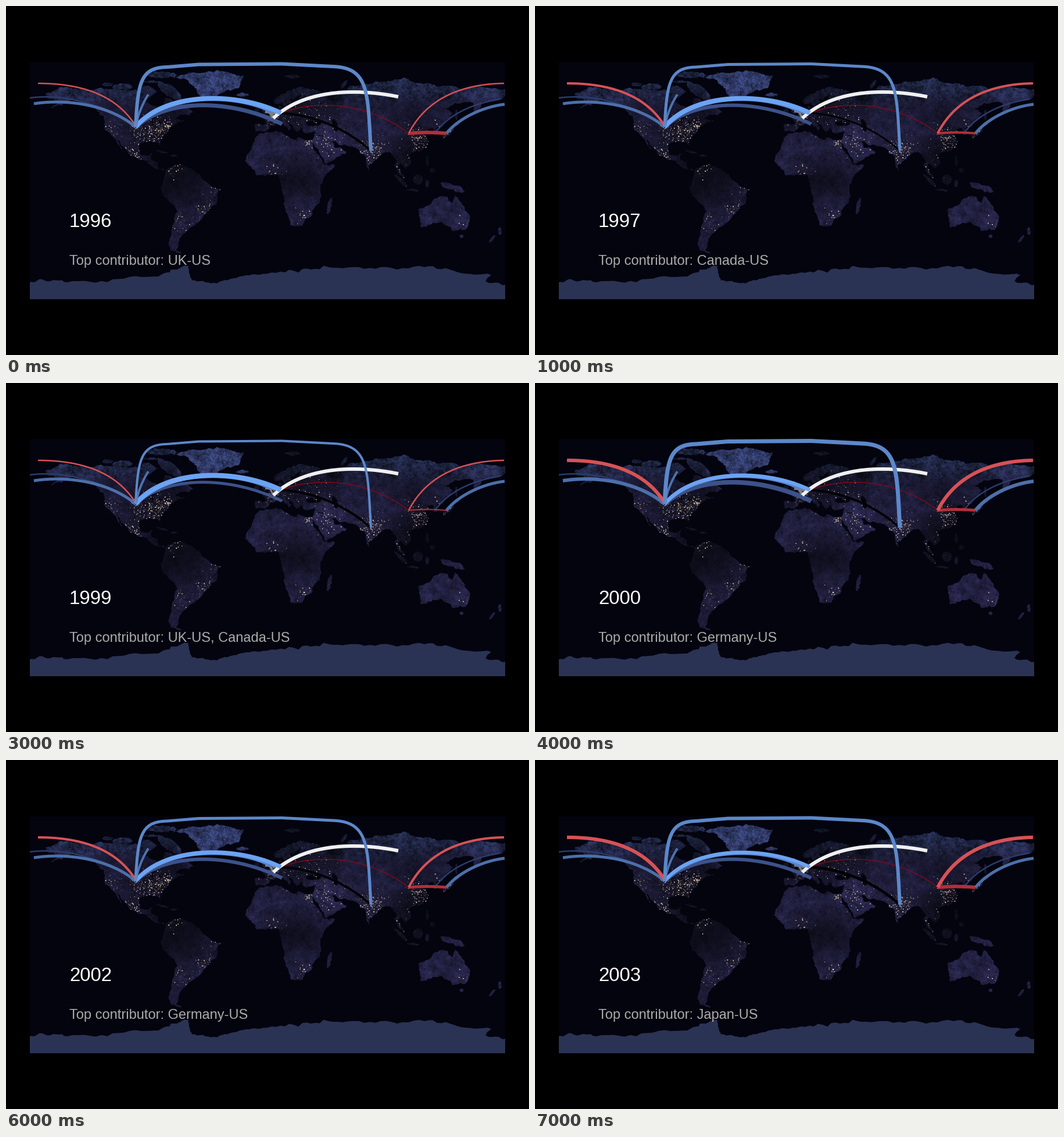
A matplotlib script for the animation above (8000 ms loop, 900 by 600 pixels).

```python
import numpy as np
import matplotlib.pyplot as plt
from matplotlib.animation import FuncAnimation
from matplotlib.patches import PathPatch, Rectangle
from matplotlib.path import Path

W, H, DPI = 900, 600, 100
LEFT, RIGHT, TOP, BOTTOM = 41, 859, 96.5, 504.5
SCALE = (RIGHT - LEFT) / 360
PT = 72 / DPI
OCEAN = "#04040f"
rng = np.random.default_rng(5)

fig = plt.figure(figsize=(W / DPI, H / DPI), dpi=DPI, facecolor="black")
ax = fig.add_axes([0, 0, 1, 1])
ax.axis("off")
ax.add_patch(Rectangle((LEFT, TOP), RIGHT - LEFT, BOTTOM - TOP, color=OCEAN, lw=0))


def project(lonlat):
    return np.array([W / 2, (TOP + BOTTOM) / 2]) + np.asarray(lonlat) * [SCALE, -SCALE]


def rough(p, rounds):
    """Break each edge up so that it reads as a coast."""
    for _ in range(rounds):
        q = np.roll(p, -1, 0)
        d = q - p
        size = np.hypot(*d.T)[:, None] + 1e-6
        push = rng.normal(0, 0.11, size.shape) * np.minimum(size, 14) / size
        mid = (p + q) / 2 + push * d[:, ::-1] * [1, -1]
        p = np.stack([p, mid], 1).reshape(-1, 2)
    return p


def coast(p, rounds=4):
    p = rough(p, rounds)
    x, y = p.T
    if np.sum(x * np.roll(y, -1) - y * np.roll(x, -1)) < 0:
        p = p[::-1]
    return Path(np.vstack([p, p[:1]]), closed=True)


def oval(lon, lat, rx, ry, tilt=0):
    a = np.linspace(0, 2 * np.pi, 10, endpoint=False)
    z = (rx * np.cos(a) + 1j * ry * np.sin(a)) * np.exp(1j * np.radians(tilt))
    return coast(project(np.column_stack([lon + z.real, lat + z.imag])), 2)


lands = []


def land(*coords):
    lands.append(coast(project(np.reshape(coords, (-1, 2)))))


def isle(*shape):
    lands.append(oval(*shape))


def sea(*shape):
    ax.add_patch(PathPatch(oval(*shape), fc=OCEAN, lw=0, zorder=2))


# Americas
land(-168, 66, -156, 71, -128, 70, -96, 68, -94, 72, -82, 68, -94, 60, -82, 55, -80, 51,
     -77, 56, -78, 62, -66, 59, -62, 57, -56, 52, -66, 50, -70, 47, -61, 46, -70, 43,
     -76, 36, -81, 31, -81, 25, -83, 29, -90, 30, -97, 28, -97, 20, -91, 19, -87, 21,
     -88, 16, -83, 14, -82, 9, -77, 8, -84, 9, -95, 16, -105, 20, -113, 31, -110, 23,
     -117, 33, -124, 40, -124, 49, -134, 58, -147, 61, -164, 55, -158, 59, -166, 62)
land(-77, 8, -71, 12, -62, 11, -51, 4, -44, -3, -35, -6, -39, -18, -48, -26, -58, -35,
     -62, -39, -65, -42, -69, -52, -65, -55, -73, -53, -75, -47, -70, -20, -76, -14,
     -81, -5, -78, 3)
land(-72, 78, -60, 76, -54, 70, -53, 66, -43, 60, -32, 68, -22, 70, -18, 80, -35, 83, -60, 82)
isle(-74, 68, 11, 4, -35)
isle(-110, 71, 8, 2.5)
isle(-121, 73, 4, 1.5)
isle(-80, 80, 12, 2.5)
isle(-88, 75, 7, 1)
isle(-80, 22, 5, 0.7, -15)
isle(-71, 19, 3, 0.8)
# Europe
land(-9, 43, -1, 43, -4, 48, 8, 54, 9, 57, 11, 54, 20, 55, 24, 59, 30, 60, 22, 60, 25, 65,
     17, 62, 18, 59, 13, 56, 11, 59, 6, 58, 5, 62, 15, 68, 25, 71, 41, 67, 33, 66, 44, 66,
     63, 69, 63, 37, 27, 37, 26, 40, 22, 37, 19, 42, 13, 46, 18, 40, 16, 38, 9, 44, 3, 42,
     -2, 37, -9, 37)
isle(-19, 65, 5, 1.4)
isle(-2, 54, 2, 4)
isle(-8, 53, 2, 2)
isle(19, 79, 6, 1.3)
# Asia
land(60, 69, 68, 72, 87, 75, 104, 78, 113, 74, 140, 72, 183, 69, 178, 62, 163, 60, 157, 51,
     156, 59, 142, 59, 135, 54, 141, 52, 139, 47, 128, 40, 129, 35, 126, 35, 125, 40,
     118, 39, 122, 37, 119, 35, 122, 30, 117, 23, 107, 20, 109, 13, 105, 9, 101, 13, 99, 10,
     104, 1, 98, 8, 98, 15, 92, 22, 87, 21, 80, 15, 77, 8, 73, 20, 67, 25, 57, 27, 49, 30,
     36, 37, 60, 40)
land(49, 30, 51, 25, 56, 25, 60, 22, 45, 13, 35, 28, 34, 31, 36, 37)
isle(58, 73, 1.2, 4, -35)
isle(137, 36, 6, 1.2, 40)
isle(143, 43, 2, 1.3)
isle(143, 50, 0.8, 4)
isle(121, 15, 1.3, 4)
isle(125, 8, 2, 2)
isle(114, 1, 4, 4)
isle(101, 0, 7, 1.5, -45)
isle(110, -7, 5, 0.8, -5)
isle(121, -2, 1.5, 3)
# Africa and Oceania
land(-6, 36, 10, 37, 20, 31, 33, 31, 37, 21, 43, 12, 51, 12, 40, -3, 40, -15, 35, -21,
     33, -27, 26, -34, 18, -34, 12, -17, 9, 0, 9, 4, -8, 4, -17, 15, -10, 30)
land(114, -22, 130, -12, 136, -12, 140, -17, 142, -11, 153, -26, 150, -37, 140, -38,
     136, -34, 131, -31, 116, -35)
isle(47, -19, 1.6, 6.5, -12)
isle(140, -5, 10, 2.5, -20)
isle(147, -42, 1.5, 1.3)
isle(176, -38, 1.3, 3)
isle(170, -44, 1, 3.5, -40)
# Antarctica, in stage pixels
ice = [(30, 477), (105, 475), (262, 465), (300, 450), (314, 447), (320, 472), (362, 477),
       (400, 466), (450, 460), (570, 450), (720, 449), (836, 463), (825, 473), (870, 477),
       (870, 700), (30, 700)]
lands.append(coast(np.array(ice, float)))

sea(35, 43.5, 6, 1.8)
sea(51, 42, 2, 5, 15)
sea(-88, 47.6, 3.5, 0.7)
sea(-87, 44, 0.8, 2)
sea(-81, 44.5, 1.5, 1)

# Ground brightness: lon, lat, level
TONES = [(-110, 68, 33), (-40, 73, 45), (-95, 53, 21), (-110, 40, 30), (-82, 37, 19),
         (-62, -4, 13), (-42, -12, 27), (-66, -33, 30), (5, 48, 17), (30, 62, 20),
         (8, 24, 38), (45, 24, 36), (20, 2, 13), (22, -25, 32), (80, 43, 31),
         (110, 58, 23), (115, 70, 36), (78, 20, 28), (108, 12, 15), (133, -25, 36)]


def ground(w=818, h=408):
    lon, lat = np.meshgrid(np.linspace(-180, 180, w), np.linspace(90, -90, h))
    level, total = np.zeros((h, w)), np.zeros((h, w))
    for x, y, v in TONES:
        d = (lon - x) ** 2 + (lat - y) ** 2
        weight = np.exp(-d / 260) + 1e-3 / (1 + d)
        level += weight * v
        total += weight
    k = np.hypot(np.fft.fftfreq(h)[:, None] * h, np.fft.rfftfreq(w) * w / 2) + 4
    noise = np.fft.irfft2(np.fft.rfft2(rng.normal(size=(h, w))) / k ** 1.1, (h, w))
    level *= np.clip(1 + (0.13 + 0.1 * (lat > 60)) * noise / noise.std(), 0.45, 1.5) / total
    cool = np.clip((lat - 55) / 15, 0, 1) * 0.25
    rgb = np.stack([level, level * (0.96 + cool), level * (1.9 + cool)], -1)
    rgb[lat < -62] = 43, 51, 84
    return np.clip(rgb / 255, 0, 1)


earth = ax.imshow(ground(), extent=(LEFT, RIGHT, BOTTOM, TOP), aspect="auto", zorder=1,
                  interpolation="bilinear")
earth.set_clip_path(PathPatch(Path.make_compound_path(*lands), transform=ax.transData))

# City lights: lon, lat, spread, count
CITIES = [(-84, 38, 6, 330), (-75, 41, 2, 60), (-97, 36, 6, 150), (-120, 38, 4, 100),
          (-100, 20, 4, 70), (-73, 8, 4, 60), (-46, -22, 4, 110), (-38, -8, 3, 50),
          (-64, -33, 5, 60), (6, 48, 6, 170), (35, 52, 9, 120), (31, 29, 2, 60),
          (47, 29, 7, 140), (5, 7, 4, 50), (28, -27, 3, 45), (78, 22, 6, 290),
          (116, 31, 6, 270), (133, 36, 4, 160), (103, 10, 6, 90), (149, -34, 4, 30)]
spots = project(np.vstack([rng.normal((x, y), s, (n, 2)) for x, y, s, n in CITIES]))
spots = spots[np.any([p.contains_points(spots) for p in lands], axis=0)]
glow = rng.random(len(spots)) ** 2
tint = np.column_stack([0.72 + 0.28 * glow, 0.58 + 0.34 * glow, 0.42 + 0.36 * glow,
                        0.35 + 0.65 * glow])
ax.scatter(*spots.T, s=0.25 + 1.5 * glow ** 2, c=tint, lw=0, zorder=3)


def bend(p0, p1, p2, p3):
    t = np.linspace(0, 1, 60)[:, None]
    p0, p1, p2, p3 = map(np.array, (p0, p1, p2, p3))
    return ((1 - t) ** 3 * p0 + 3 * t * (1 - t) ** 2 * p1
            + 3 * t ** 2 * (1 - t) * p2 + t ** 3 * p3)


routes = []


def route(color, widths, *curves):
    """One trade route; widths is its weight in each year, or one for all."""
    lines = [ax.plot(*np.array(c).T, color=color, solid_capstyle="butt",
                     solid_joinstyle="round", zorder=4)[0] for c in curves]
    routes.append((lines, np.broadcast_to(widths, 8)))


US, DE, CN, JP, IN = (223, 208), (473, 184), (693, 219), (758, 219), (628, 249)

route("#020205", (4, 3, 1.5, 4, 4, 4, 4, 5), bend(DE, (528, 187), (585, 210), IN))
route("#7c0a19", [5 if i == 2 else 1.5 for i in range(8)],
      bend(DE, (530, 162), (620, 163), CN))
route("#2b3c6c", 2.5, bend((41, 158), (100, 150), (172, 170), US),
      bend((738, 219), (760, 188), (800, 168), (851, 160)))
route("#b12f3a", (6, 4, 2, 2, 5, 5, 5, 6), bend(CN, (714, 217), (737, 217), JP))
route("#3c5289", (7, 6, 6, 5, 8, 5, 6, 6), bend(US, (280, 157), (390, 161), (475, 203)))
route("#4c70aa", (5, 5, 5.5, 5, 6, 4.5, 5, 5), bend((48, 168), (105, 159), (178, 170), US),
      bend(JP, (775, 197), (815, 174), (858, 169)))
route("#d75257", (2.5, 4, 5, 2.5, 6, 2, 4, 6),
      bend((55, 133), (130, 133), (190, 153), (223, 206)),
      bend(CN, (722, 162), (780, 134), (857, 133)))
route("#7d7f88", (6, 4, 2, 3, 5, 3, 4, 4), [(452, 178), (460, 192)], [(446, 181), (470, 184)])
route("#f0f0f0", (6, 6, 5.5, 6, 6, 7, 6, 6),
      bend((460, 193), (505, 150), (585, 138), (675, 156)))
route("#5584cc", 6, bend(US, (276, 149), (395, 150), (458, 182)))
route("#6ca3f3", (8, 8, 8, 8.5, 6.5, 8, 7, 6), bend(US, (275, 146), (400, 148), DE))
route("#4b72b0", 4, bend(US, (227, 188), (234, 169), (245, 152)))
route("#5c88ca", (6, 5, 4, 4, 7, 3.5, 5, 6),
      np.vstack([bend(US, (227, 130), (232, 106), (277, 105)), (332, 100.5), (475, 99.5),
                 bend((562, 104), (626, 106), (622, 150), IN)]))

LEADERS = ["UK-US", "Canada-US", "UK-US", "UK-US, Canada-US", "Germany-US",
           "Japan-US", "Germany-US", "Japan-US"]


def label(y, size, color):
    return ax.text(108.9, y, "", family="Liberation Sans", size=size * PT, color=color,
                   va="baseline", zorder=6)


year = label(380.5, 33, "white")
leader = label(445.5, 23.6, "#ababab")
ax.set_xlim(0, W)
ax.set_ylim(H, 0)


def draw(i):
    year.set_text(str(1996 + i))
    leader.set_text("Top contributor: " + LEADERS[i])
    for lines, widths in routes:
        for line in lines:
            line.set_linewidth(widths[i] * PT)
    return []


anim = FuncAnimation(fig, draw, frames=len(LEADERS), interval=1000, repeat=True,
                     repeat_delay=0, blit=False)
plt.show()
```
